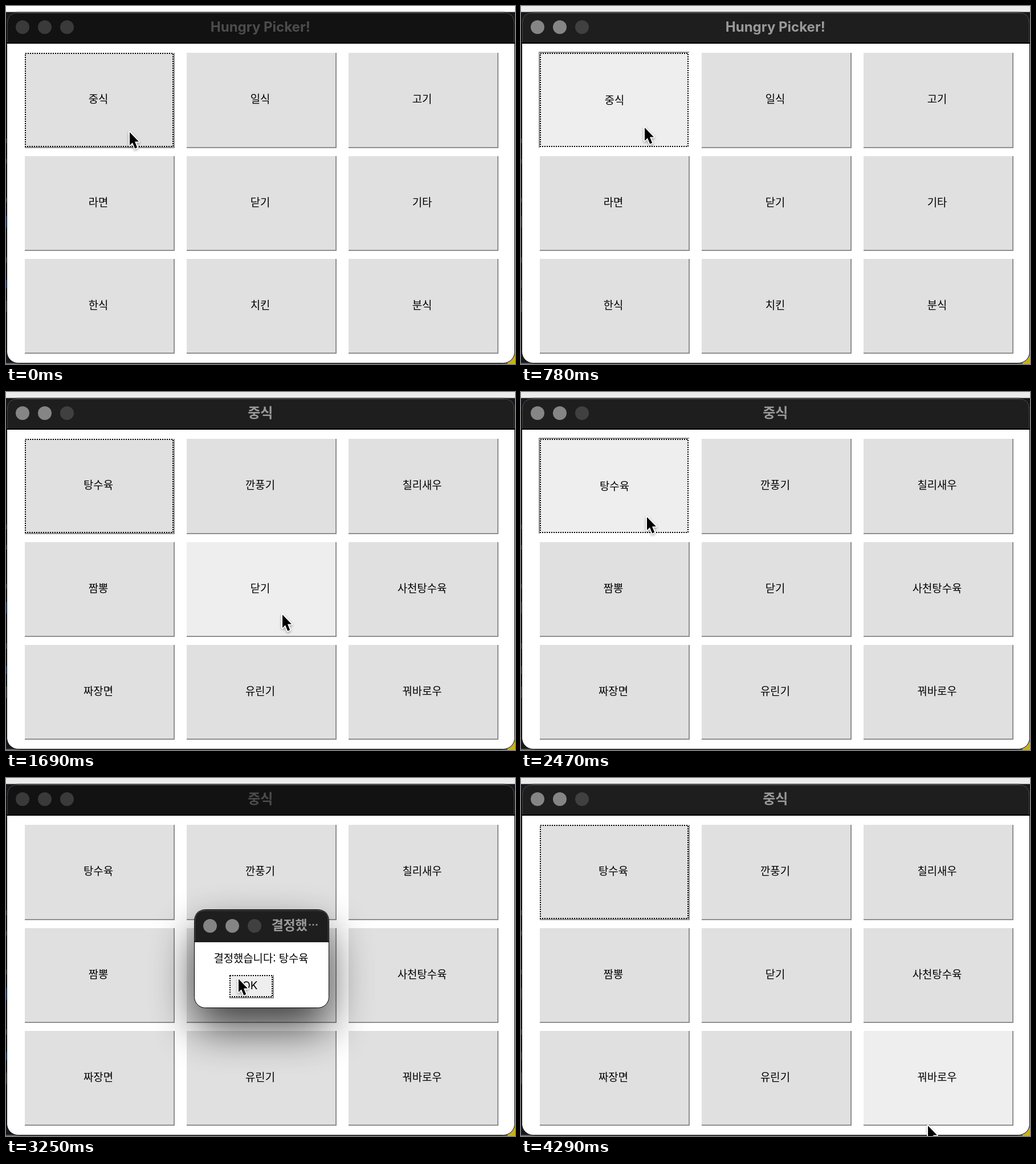
These frames come from a looping animation (893 px wide and 627 px high, 4.42 s). An HTML page:

```html
<!DOCTYPE html>
<html lang="ko">
<head>
<meta charset="utf-8">
<title>Menu picker</title>
<style>
html, body { margin: 0; width: 100%; height: 100%; overflow: hidden; background: #15161a; }
svg { display: block; width: 893px; height: 627px; }
text { font: 18.8px "Noto Sans CJK KR", "Noto Sans CJK", sans-serif; text-anchor: middle; fill: #000; }
.title { font-weight: 700; font-size: 24px; }
.latin { font-family: Inter, sans-serif; }
.dots { fill: none; stroke: #000; stroke-width: 2; stroke-dasharray: 2 2; }
.shadow { filter: blur(38px); fill: #000; opacity: .72; }
#cursor { filter: drop-shadow(0 2px 2px rgba(0, 0, 0, .35)); }
</style>
</head>
<body>
<svg id="stage" viewBox="0 0 893 627"></svg>
<script>
const LOOP = 4420;
const MENUS = [
  { title: "Hungry Picker!", items: "중식 일식 고기 라면 닫기 기타 한식 치킨 분식".split(" ") },
  { title: "중식", items: "탕수육 깐풍기 칠리새우 짬뽕 닫기 사천탕수육 짜장면 유린기 꿔바로우".split(" ") }
];
const COLS = [33, 317, 601];
const ROWS = [[82, 165], [263, 164], [443, 164]];

// [time, pointer x, pointer y, mode, hovered button]
const STEPS = [
  [0, 217, 221, "idle"],
  [520, 217, 219, "home", 0],
  [650, 217, 213, "home", 0],
  [780, 217, 213, "homePress", 0],
  [910, 217, 213, "home", 0],
  [1040, 217, 213, "menu", 0],
  [1170, 226, 219, "menu", 0],
  [1300, 272, 246, "menu", 0],
  [1430, 372, 316, "menu", 4],
  [1560, 454, 370, "menu", 4],
  [1690, 485, 390, "menu", 4],
  [1950, 470, 381, "menu", 4],
  [2080, 390, 328, "menu", 4],
  [2210, 280, 243, "menu", 0],
  [2340, 225, 220, "menu", 0],
  [2470, 221, 219, "menuPress", 0],
  [2600, 221, 219, "menu", 0],
  [2730, 221, 219, "dialog"],
  [2860, 262, 248, "dialog"],
  [2990, 352, 314, "dialog"],
  [3120, 406, 354, "dialogHover"],
  [3250, 408, 352, "dialogHover"],
  [3640, 408, 351, "menu"],
  [3900, 428, 368, "menu"],
  [4030, 530, 437, "menu"],
  [4160, 656, 530, "menu", 8],
  [4290, 714, 609, "menu", 8]
];

const stage = document.getElementById("stage");

function set(el, attrs) {
  for (const k in attrs) el.setAttribute(k, attrs[k]);
  return el;
}
function add(parent, tag, attrs, text) {
  const el = set(document.createElementNS("http://www.w3.org/2000/svg", tag), attrs);
  if (text) el.textContent = text;
  parent.appendChild(el);
  return el;
}
function rect(parent, x, y, width, height, fill, more) {
  return add(parent, "rect", { x, y, width, height, fill, ...more });
}
function show(el, on) {
  el.style.display = on ? "" : "none";
}

function lights(parent, x, y) {
  return [0, 1, 2].map(i => add(parent, "circle", { cx: x + 39 * i, cy: y, r: 12 }));
}
function paintLights(dots, active) {
  dots.forEach((d, i) => d.setAttribute("fill", active ? (i < 2 ? "#858585" : "#404040") : "#3a3a3a"));
}

function makeButton(parent, x, y, w, h, labelX, labelY, cls = "") {
  const low = add(parent, "path", { fill: "#8f8f8f", d: `M${x + w} ${y}h2v${h + 2}h${-w - 2}v-2h${w}z` });
  const high = add(parent, "path", { fill: "#8f8f8f", d: `M${x - 2} ${y - 2}h${w + 4}l-2 2h${-w}v${h}l-2 2z` });
  const face = rect(parent, x, y, w, h, "#e0e0e0");
  const label = add(parent, "text", { x: labelX, y: labelY, class: cls });
  const ring = rect(parent, x + 1, y + 1, w - 2, h - 2, "none", { class: "dots" });
  return (text, hot, pressed, focus) => {
    if (label.textContent !== text) label.textContent = text;
    face.setAttribute("fill", hot ? "#eee" : "#e0e0e0");
    label.setAttribute("transform", pressed ? "translate(2 2)" : "translate(0 0)");
    show(low, !pressed);
    show(high, pressed);
    show(ring, focus);
  };
}

// Desktop showing around the window
rect(stage, 0, 0, 893, 627, "#17181c");
const strip = rect(stage, 0, 0, 893, 10.5, "#ebebeb");
rect(stage, 866, 600, 27, 27, "#c9b116");
rect(stage, 0, 625, 880, 2, "#5b5c5e");
[[232, 8], [268, 8], [336, 8], [440, 10], [516, 20]].forEach(([y, h]) => rect(stage, 0, y, 1, h, "#55585e"));
[[368, 20], [480, 14]].forEach(([y, h]) => rect(stage, 0, y, 1, h, "#2c5590"));

// Main window
rect(stage, 1.5, 11, 891, 614.5, "#fff", { rx: 20, stroke: "#000", "stroke-width": 1 });
const bar = add(stage, "path", { d: "M2 66V30Q2 12 20 12H874Q892 12 892 30V66Z" });
add(stage, "path", { d: "M2.5 64V30Q2.5 12 20 12H874Q891.5 12 891.5 30V64", fill: "none", stroke: "#4b4b4b" });
rect(stage, 2, 64, 891, 2, "#000");
const mainLights = lights(stage, 29, 37);
const mainTitle = add(stage, "text", { x: 446.3, y: 45 });
const buttons = ROWS.flatMap(([y, h]) => COLS.map(x => makeButton(stage, x, y, 261, h, x + 129, Math.round(y + 88))));

// Message box
const dialog = add(stage, "g", {});
rect(dialog, 331, 267, 235, 171, "#000", { rx: 18, class: "shadow" });
rect(dialog, 330.5, 230.5, 236, 172, "#fff", { rx: 19, stroke: "#000" });
add(dialog, "path", { d: "M331 287V249Q331 231 349 231H548Q566 231 566 249V287Z", fill: "#1e1e1e" });
add(dialog, "path", { d: "M331.5 286V250Q331.5 232 349 232H548Q565.5 232 565.5 250V286", fill: "none", stroke: "#555" });
rect(dialog, 331, 286, 235, 1.5, "#000");
paintLights(lights(dialog, 358, 259), true);
add(dialog, "text", { x: 497, y: 266, class: "title", fill: "#9a9a9a", style: "font-size:23px;letter-spacing:-.4px;fill:#9a9a9a" }, "결정했");
[533, 539, 545].forEach(cx => add(dialog, "circle", { cx, cy: 257, r: 1.6, fill: "#9a9a9a" }));
add(dialog, "text", { x: 447.5, y: 323 }, "결정했습니다: 탕수육");
const okButton = makeButton(dialog, 392, 345, 76, 39, 428, 370, "latin");

// Pointer
const cursor = add(stage, "g", { id: "cursor" });
add(cursor, "path", {
  d: "M0 0V23L5 18.2 9.2 28.4 13.2 26.7 9 16.6H16Z",
  fill: "#000", stroke: "#fff", "stroke-width": 3.6, "stroke-linejoin": "round", "paint-order": "stroke"
});

function draw([, x, y, mode, hot]) {
  const home = mode === "idle" || mode.startsWith("home");
  const asking = mode.startsWith("dialog");
  const active = mode !== "idle" && !asking;
  const pressed = mode.endsWith("Press");
  const menu = MENUS[home ? 0 : 1];

  strip.setAttribute("fill", mode === "idle" ? "#fdfdfd" : "#ebebeb");
  bar.setAttribute("fill", active ? "#1e1e1e" : "#121212");
  paintLights(mainLights, active);
  mainTitle.textContent = menu.title;
  mainTitle.setAttribute("class", home ? "title latin" : "title");
  mainTitle.style.fill = active ? "#9a9a9a" : "#4c4c4c";
  buttons.forEach((paint, i) => paint(menu.items[i], hot === i, pressed && hot === i, i === 0 && !asking));
  show(dialog, asking);
  okButton("OK", mode === "dialogHover", false, true);
  cursor.setAttribute("transform", `translate(${x} ${y})`);
}

let last;
function tick() {
  const t = performance.now() % LOOP;
  const step = STEPS.findLast(s => s[0] <= t);
  if (step !== last) draw(last = step);
  requestAnimationFrame(tick);
}
tick();
</script>
</body>
</html>
```
